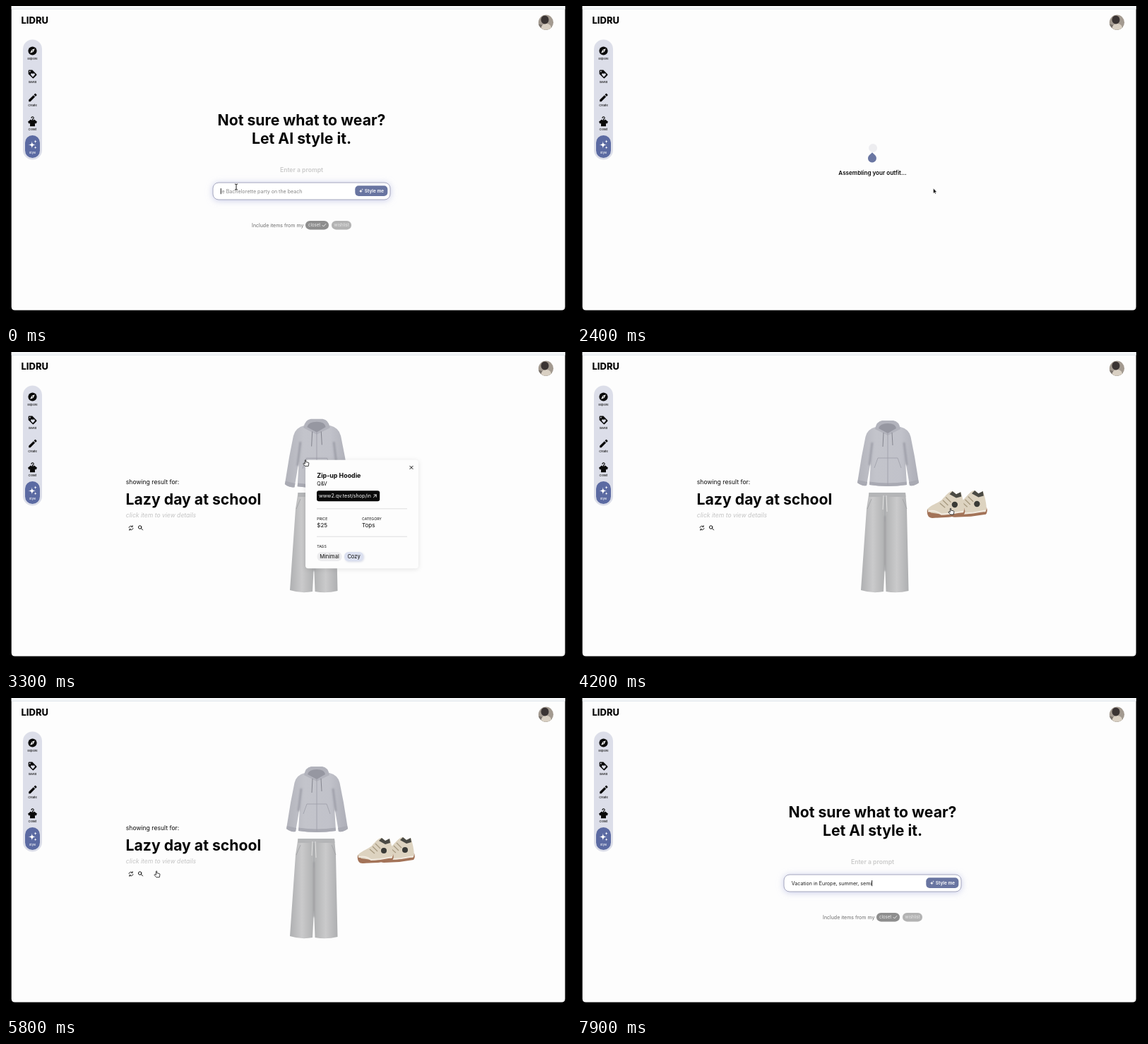
Write an HTML page that moves like this. It is 800x450 px and loops after 8 s.

```html
<!DOCTYPE html>
<html lang="en">
<head>
<meta charset="utf-8">
<title>Outfit stylist</title>
<style>
  html, body { margin: 0; width: 100%; height: 100%; overflow: hidden; background: #000; }
  svg { display: block; width: 100vw; height: 100vh; font-family: Inter, Roboto, sans-serif; fill: #0a0a0a; }
  .mid { text-anchor: middle; }
  .semi { font-weight: 600; }
  .bold { font-weight: 700; }
  .big { font-size: 21.2px; font-weight: 700; fill: #050505; }
  .line { fill: none; stroke: #0a0a0a; stroke-linecap: round; stroke-linejoin: round; }
  .glow { filter: drop-shadow(0 1px 5px #a9aede99); }
  .lift { filter: drop-shadow(0 1px 3px #0000001c); }
  .chip { filter: drop-shadow(1px 1px 1.5px #9aa3c466); }
  .soft { filter: blur(1.2px); }
  .nav text { font-size: 3.9px; text-anchor: middle; font-weight: 500; }
</style>
</head>
<body>
<svg viewBox="0 0 800 450" preserveAspectRatio="none">
  <defs>
    <linearGradient id="knit"><stop stop-color="#b2b3bb"/><stop offset=".3" stop-color="#c3c4cb"/><stop offset=".7" stop-color="#c1c2ca"/><stop offset="1" stop-color="#adaeb7"/></linearGradient>
    <linearGradient id="leg"><stop stop-color="#aeafb1"/><stop offset=".25" stop-color="#cacacb"/><stop offset=".46" stop-color="#b4b5b6"/><stop offset=".54" stop-color="#b4b5b6"/><stop offset=".75" stop-color="#cacacb"/><stop offset="1" stop-color="#aeafb1"/></linearGradient>
    <clipPath id="face"><circle cx="764.5" cy="23.2" r="10.6"/></clipPath>
    <clipPath id="url"><rect x="18" y="43" width="75" height="15"/></clipPath>
    <g id="shoe">
      <path d="M1 25C0 32 2 37 8 37L30 36 50 33Q53 29 51 24Z" fill="#a37358"/>
      <path d="M1 26C3 21 13 18 20 13 26 7 30 1 35 1L40 5 46 2Q50 12 51 26L49 30C36 29 30 34 20 32L6 30Z" fill="#ddd3c0"/>
      <path d="M2 28Q12 26 20 32L33 31 50 28" fill="none" stroke="#f1eadf" stroke-width="2"/>
      <path d="M18 17L25 23M22 13L29 20M26 9L33 16" fill="none" stroke="#a89b82" stroke-width="1.3"/>
      <path d="M31 5L35 1 40 5 46 2 47 8 40 10Z" fill="#4a4a44"/>
      <circle cx="38" cy="19" r="4" fill="#3a3b37"/>
    </g>
  </defs>

  <path d="M7.7 0H791.6V425.6Q791.6 430.6 786.6 430.6H12.7Q7.7 430.6 7.7 425.6Z" fill="#fdfdfd"/>
  <path d="M7.7 0H791.6V4H7.7Z" fill="#f4f6f8"/>
  <path d="M7.7 4.3H791.6" stroke="#dde3e9" stroke-width=".9"/>
  <text x="21.5" y="24.6" font-size="13" font-weight="800">LIDRU</text>
  <g clip-path="url(#face)">
    <path d="M750 10H780V36H750Z" fill="#a39a90"/>
    <path d="M750 36V24L762 28 780 30V36Z" fill="#77706a"/>
    <path d="M757 36Q757 25 765 25T773 36Z" fill="#d9d0c3"/>
    <ellipse cx="763" cy="19.5" rx="5.5" ry="6" fill="#3a3433"/>
  </g>

  <g class="nav" id="nav">
    <rect x="24" y="47.5" width="27" height="170" rx="13.5" fill="#dcdee9"/>
    <rect x="27" y="183" width="21" height="32" rx="10.5" fill="#5b6aa2"/>
    <circle cx="37.5" cy="63.5" r="6.1"/>
    <path d="M40.8 60.2L38.8 64.8 34.2 66.8 36.2 62.2Z" fill="#fff"/><circle cx="37.5" cy="63.5" r=".8"/>
    <path d="M32.8 90.6H37.3L43.2 96.5Q43.8 97.3 43.2 98.1L39.2 102.1Q38.4 102.7 37.6 102.1L31.7 96.2V91.7Q31.7 90.6 32.8 90.6Z"/>
    <circle cx="33.8" cy="92.7" r=".9" fill="#dcdee9"/>
    <path d="M38 100.4L35.4 97.8C34.2 96 36.6 94.3 38 96 39.4 94.3 41.8 96 40.6 97.8Z" fill="#dcdee9"/>
    <path d="M32.2 132.8V135.2H34.6L41.2 128.6 38.8 126.2ZM39.5 125.5L41 124Q41.5 123.7 42 124L43.4 125.4Q43.7 125.9 43.4 126.4L41.9 127.9Z"/>
    <path class="line" d="M36 158.4A1.6 1.6 0 1 1 37.5 160V162" stroke-width="1.1"/>
    <path d="M35 160.6Q37.5 163 40 160.6L44 163.8 42.6 166.6 41 166V170.2H34V166L32.4 166.6 31 163.8Z"/>
  </g>

  <g id="home">
    <text class="big mid" x="418.5" y="169">Not sure what to wear?</text>
    <text class="big mid" x="418.5" y="195.2">Let AI style it.</text>
    <text class="mid semi" x="418.5" y="234.7" font-size="8.6" fill="#cacaca">Enter a prompt</text>
    <rect class="glow" x="293" y="250" width="251" height="24" rx="8" fill="#fff" stroke="#9da0b8" stroke-width=".9"/>
    <text id="field" x="303.8" y="264.5" font-size="7.1"></text>
    <path id="caret" d="M0 258V266.2" stroke="#111" stroke-width=".9"/>
    <rect id="button" x="494.3" y="254.2" width="46" height="14.8" rx="5" fill="#6975a1"/>
    <path id="stars" fill="#fff"/>
    <text class="semi" x="507.8" y="264" font-size="6.5" fill="#fff">Style me</text>
    <text x="348" y="312.9" font-size="7" fill="#6b6b6b">Include items from my</text>
    <rect x="424" y="304" width="33" height="12.4" rx="6.2" fill="#8e8e8e"/>
    <rect x="461" y="304" width="28" height="12.4" rx="6.2" fill="#b3b3b3"/>
    <text x="428" y="312.3" font-size="6" fill="#eee">closet</text>
    <path class="line" d="M448 310.4L449.6 312 452.8 308.4" style="stroke:#eee" stroke-width=".9"/>
    <text x="464.6" y="312.3" font-size="6" fill="#e6e6e6">wishlist</text>
  </g>

  <g id="load">
    <g id="spin">
      <circle cx="419" cy="201" r="6" fill="#ededf0"/>
      <path d="M418 207.3L422.3 211.3A6 6 0 1 1 413.7 211.3Z" fill="#6a76a2"/>
    </g>
    <text class="mid semi" x="418.5" y="238.6" font-size="8.1">Assembling your outfit...</text>
  </g>

  <g id="result">
    <text x="169.8" y="187" font-size="8.6">showing result for:</text>
    <text class="big" x="169.6" y="215.8">Lazy day at school</text>
    <text x="169.8" y="234" font-size="8.6" font-style="italic" fill="#c3c3c3">click item to view details</text>
    <path class="line" d="M174 248.6A2.9 2.9 0 0 1 179 247.2M180 249.4A2.9 2.9 0 0 1 175 250.8M179.2 245.6V247.3H177.5M174.8 252.4V250.7H176.5" stroke-width=".8"/>
    <path class="line" d="M191.3 249.6L193.6 251.9M191.9 248A2.2 2.2 0 1 1 187.5 248 2.2 2.2 0 1 1 191.9 248" stroke-width="1"/>
    <g id="pants">
      <path d="M413.5 199H465L467 222 469.5 338Q453 342 437.5 339L436 300 434 339Q418 342 402 337L410 222Z" fill="url(#leg)"/>
      <path class="soft" d="M436 232V310" fill="none" stroke="#9b9c9e" stroke-width="2"/>
      <path d="M413.5 199H465L465.5 205H413Z" fill="#b4b5b7"/>
      <path d="M436 205V240M411 222L417 208M467 222L461 208" fill="none" stroke="#a0a1a4" stroke-width=".8"/>
      <path d="M434 203L433 223M438 203L439 226" fill="none" stroke="#e2e2e2" stroke-width="1"/>
    </g>
    <g id="hoodie">
      <path d="M423 106Q411 109 408.5 120L403 148 397 185Q403 190 410 189L416 154 414 188Q440 192 467 188L465 154 471 189Q478 190 484 185L478 148 472.5 120Q470 109 458 106Z" fill="url(#knit)"/>
      <path class="soft" d="M418 128L414 160M463 128L467 160" fill="none" stroke="#9c9da7" stroke-width="2.6"/>
      <path d="M414.4 183.5Q440 187.5 466.6 183.5L467 188Q440 192 414 188ZM398 181L411 184 410 189Q403 190 397 185ZM483 181L470 184 471 189Q478 190 484 185Z" fill="#a9aab3"/>
      <path d="M422 109Q424 98 432 97H448Q456 98 458 109L440 118Z" fill="#b2b3bc"/>
      <path d="M427 108Q429 101 440 101T452 108L440 115Z" fill="#9697a1"/>
      <path d="M440 114V188M421 164L426 150H454L459 164" fill="none" stroke="#9c9da7" stroke-width=".8"/>
      <path d="M434 114L433 134M446 114L447 132" fill="none" stroke="#85868f" stroke-width="1"/>
    </g>
    <g id="shoes">
      <use href="#shoe" x="527" y="196"/>
      <use href="#shoe" x="497" y="197"/>
    </g>
  </g>

  <g id="cards"></g>

  <g id="cursor">
    <path id="arrow" d="M0 0V7.2L1.7 5.7 2.7 8 3.8 7.5 2.8 5.3H5Z" stroke="#fff" stroke-width=".5"/>
    <path id="hand" d="M-.7.6Q0-.5.7.6V3.2L4 3.8Q5 4 4.8 5.4L4.2 9H-.3L-3 6Q-3.2 4.6-1.7 5L-.7 5.8Z" fill="#fff" stroke="#111" stroke-width=".8"/>
    <path id="beam" class="line" d="M-1.7-4Q0-4 0-3 0-4 1.7-4M0-3V3M-1.7 4Q0 4 0 3 0 4 1.7 4" stroke-width=".9"/>
  </g>
</svg>
<script>
const $ = id => document.getElementById(id);
const LOOP = 8000;

const star = (x, y, r) =>
  `M${x} ${y - r}Q${x} ${y} ${x + r} ${y} ${x} ${y} ${x} ${y + r} ${x} ${y} ${x - r} ${y} ${x} ${y} ${x} ${y - r}Z`;
$('stars').setAttribute('d', star(502.3, 262, 3) + star(504.7, 259.6, 1.3));

$('nav').innerHTML += ['Explore', 'Saved', 'Create', 'Closet', 'Style'].map((label, i) =>
  `<text x="37.5" y="${76.2 + 33.1 * i}" fill="${i == 4 ? '#fff' : '#0a0a0a'}">${label}</text>`).join('') +
  `<path d="${star(36.8, 196.4, 5.2) + star(41.6, 191.8, 2.2) + star(41.6, 200.2, 2)}" fill="#fff"/>`;

const PLAIN = '#ededef', BLUE = '#dbe0f0';
const tag = ([label, x, w, fill]) =>
  `<rect class="${fill == BLUE ? 'chip' : ''}" x="${x}" y="130.3" width="${w}" height="13" rx="6" fill="${fill}"/>
   <text x="${x + w / 2}" y="139.4" class="mid" font-size="7.5">${label}</text>`;

const card = (id, title, brand, url, price, kind, tags) => `<g id="${id}">
  <rect class="lift" width="160" height="153.5" rx="4" fill="#fdfdfd"/>
  <path class="line" d="M147.9 8.6L152.1 12.8M152.1 8.6L147.9 12.8" stroke-width="1"/>
  <text class="bold" x="16.3" y="25" font-size="8.9">${title}</text>
  <text x="16.3" y="36.6" font-size="7">${brand}</text>
  <rect x="16" y="43.4" width="89.2" height="15" rx="3"/>
  <text x="19" y="53.7" font-size="7.1" fill="#fff" clip-path="url(#url)">${url}</text>
  <path class="line" d="M96.4 53L100.2 49.2M97 49.2H100.2V52.4" style="stroke:#fff" stroke-width=".9"/>
  <path d="M16 69H144M16 108.4H144" stroke="#d6d6d8" stroke-width=".8"/>
  <g font-size="5.2"><text x="16.3" y="85">PRICE</text><text x="80" y="85">CATEGORY</text><text x="16.3" y="124">TAGS</text></g>
  <g font-size="8"><text x="16.3" y="95.6">${price}</text><text x="80" y="95.6">${kind}</text></g>
  ${tags.map(tag).join('')}</g>`;

$('cards').innerHTML =
  card('top', 'Zip-up Hoodie', 'Q&amp;V', 'www2.qv.test/shop/in', '$25', 'Tops',
    [['Minimal', 16.5, 35, PLAIN], ['Cozy', 55, 27, BLUE]]) +
  card('shoeCard', 'Sport shoes', 'Zefu', 'zefu.test', '$120', 'Shoes', [['Sporty', 16.5, 32, BLUE]]);

// time, x, y
const path = [
  [0, 326, 256], [850, 326, 256], [1150, 504.5, 258], [2600, 504.5, 258], [2900, 424, 152.5],
  [3450, 424, 152.5], [3750, 573, 160], [3880, 573, 160], [4150, 529, 221], [4500, 529, 221],
  [4850, 678, 234.8], [5120, 678, 234.8], [5300, 574, 224], [5400, 514, 214], [5550, 514, 214],
  [5850, 190, 247], [6000, 190, 247], [6250, 330.5, 260.5], [LOOP, 330.5, 260.5]];
const handTimes = [[1080, 1400], [2820, 3520], [3690, 3870], [4080, 4570], [4780, 5130], [5290, 5590], [5790, 6000]];

const clamp = v => Math.max(0, Math.min(1, v));
const ease = v => v * v * (3 - 2 * v);
const within = (t, a, b) => t >= a && t < b;
const pulse = (t, a, b, d) => ease(clamp((t - a) / d) * clamp((b + d - t) / d));
const show = (id, on) => $(id).style.display = on ? '' : 'none';
const move = (id, value) => $(id).setAttribute('transform', value);

function pointer(t) {
  const i = path.findIndex(p => p[0] > t), [a, ax, ay] = path[i - 1], [b, bx, by] = path[i];
  const k = ease((t - a) / (b - a));
  return [ax + (bx - ax) * k, ay + (by - ay) * k];
}

function grow(id, x, y, k) {
  const s = 1 + .05 * k;
  move(id, `translate(${x} ${y}) scale(${s}) translate(${-x} ${-y})`);
}

function popup(id, x, y, k) {
  show(id, k > 0);
  $(id).style.opacity = k;
  move(id, `translate(${x} ${y + 18 * (1 - k)})`);
}

function typed(t, text, start, end) {
  return text.slice(0, Math.floor(text.length * clamp((t - start) / (end - start))));
}

function draw(t) {
  const home = t < 1400 || t >= 6000;
  show('home', home);
  show('load', within(t, 1400, 2600));
  show('result', within(t, 2600, 6000));

  if (home) {
    const text = t < 1400 ? typed(t, 'Lazy day at school', 60, 880)
      : typed(t, 'Vacation in Europe, summer, semi', 6430, 7880);
    const field = $('field');
    field.textContent = text || 'ie Bachelorette party on the beach';
    field.style.fill = text ? '#1c1c1c' : '#858585';
    move('caret', `translate(${304.3 + (text ? field.getComputedTextLength() : 0)} 0)`);
    show('caret', t < 1000 || t >= 6250);
    $('button').style.filter = within(t, 1080, 1400) ? 'drop-shadow(0 0 1.5px #3d4776)' : '';
  }

  move('spin', `rotate(${(t - 2400) * .36} 418.5 208)`);
  grow('hoodie', 440.5, 144, pulse(t, 2830, 3500, 120));
  grow('shoes', 538, 216, Math.max(pulse(t, 4090, 4560, 120), pulse(t, 5280, 5580, 100)));
  popup('top', 424, 152.8, pulse(t, 2960, 3830, 180));
  popup('shoeCard', 529, 221, pulse(t, 4220, 5090, 180));

  const hand = handTimes.some(([a, b]) => within(t, a, b));
  const beam = t < 950 || t >= 6180;
  show('cursor', !(within(t, 80, 860) || t >= 6500));
  show('hand', hand);
  show('beam', beam);
  show('arrow', !hand && !beam);
  move('cursor', `translate(${pointer(t)})`);
}

const start = performance.now();
function tick() {
  draw((performance.now() - start) % LOOP);
  requestAnimationFrame(tick);
}
tick();
</script>
</body>
</html>
```
